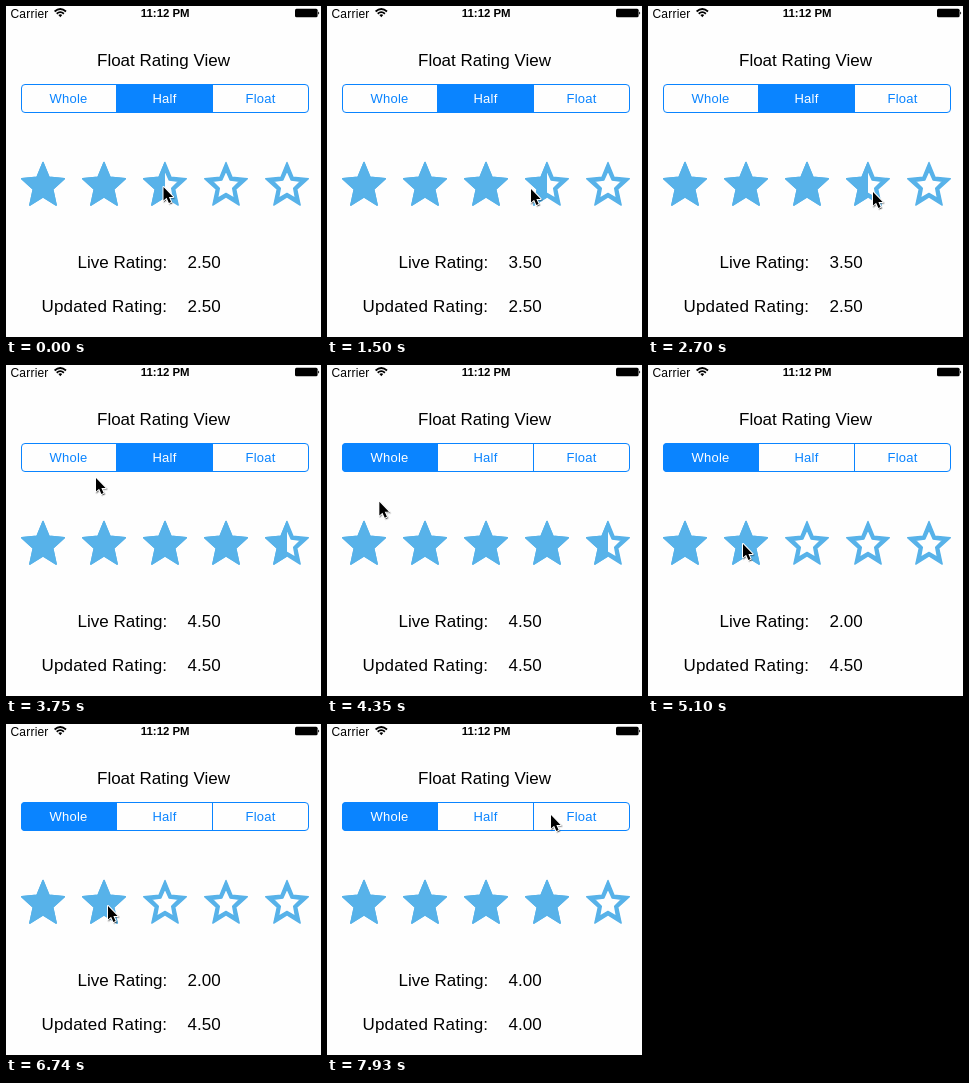
Animation of 315x331 px, one loop 8000 ms. Source, as an HTML page:

```html
<!DOCTYPE html>
<html lang="en">
<head>
<meta charset="utf-8">
<title>Float Rating View</title>
<style>
  html, body { margin: 0; width: 100%; height: 100%; overflow: hidden; background: #fefefe; }
  svg { display: block; width: 315px; height: 331px; }
  text { font: 17px "Liberation Sans", Arial, sans-serif; fill: #000; }
  .tab rect { fill: none; }
  .tab text { font-size: 13px; letter-spacing: .2px; text-anchor: middle; fill: #0a84ff; }
  .tab.on rect { fill: #0a84ff; }
  .tab.on text { fill: #fff; }
  .bar { font-size: 12px; letter-spacing: .2px; }
  .clock { font-size: 11.4px; font-weight: bold; text-anchor: middle; }
  .end { text-anchor: end; }
  .star { fill: #57b2e9; fill-rule: evenodd; stroke: #57b2e9; stroke-width: 1.4; stroke-linejoin: round; }
</style>
</head>
<body>
<svg viewBox="0 0 315 331">
  <defs>
    <clipPath id="lit"><rect id="litBox" x="0" y="150" height="60"/></clipPath>
    <clipPath id="pill"><rect x="15" y="78" width="288" height="29" rx="4"/></clipPath>
  </defs>
  <rect width="315" height="331" fill="#fefefe"/>

  <text class="bar" x="4.5" y="11.5">Carrier</text>
  <g fill="none" stroke="#000" stroke-width="1.8">
    <path d="M48.6 5.5Q54.3 .5 60 5.5"/>
    <path d="M50.7 7.7Q54.3 4.6 57.9 7.7"/>
    <path d="M52.4 9.1Q54.3 7.6 56.2 9.1L54.3 11.2Z" fill="#000" stroke="none"/>
  </g>
  <text class="clock" x="159.2" y="11">11:12 PM</text>
  <rect x="289" y="2.8" width="22.6" height="8.4" rx="1.5"/>
  <path d="M312.2 5.4Q314.2 7 312.2 8.6Z"/>

  <text x="91" y="59.5">Float Rating View</text>

  <g id="tabs" clip-path="url(#pill)"></g>
  <g fill="none" stroke="#0a84ff">
    <rect x="15.5" y="78.5" width="287" height="28" rx="3.5"/>
    <path d="M110.5 79V107M206.5 79V107"/>
  </g>

  <g id="outlines"></g>
  <g id="solids" clip-path="url(#lit)"></g>

  <text class="end" x="161.3" y="261.5">Live Rating:</text>
  <text class="end" x="161.3" y="305.5" letter-spacing=".2">Updated Rating:</text>
  <text id="live" x="181.5" y="261.5"></text>
  <text id="updated" x="181.5" y="305.5"></text>

  <g id="cursor" stroke-linejoin="round">
    <path d="M.6 1V15L3.9 12 6.3 17.2 8.7 16.2 6.4 11.2H10.8Z" stroke="#000" stroke-opacity=".12" stroke-width="2.4"/>
    <path d="M0 0V13.6L3.1 10.8 5.4 16 7.6 15 5.4 10H9.6Z" stroke="#fff" stroke-width="2" paint-order="stroke"/>
  </g>
</svg>
<script>
const LOOP = 8000, PITCH = 61, WHOLE_FROM = 4050;
const $ = id => document.getElementById(id);

// Turning points of the pointer: time, x, y
const path = [
  [0, 157.5, 181], [600, 157.5, 181], [1200, 230, 183], [1500, 204, 183],
  [2100, 69, 181], [2700, 225, 186], [3300, 274, 185], [3450, 274, 185],
  [3750, 90, 113], [4200, 60, 94], [4700, 45, 178], [5100, 95, 179],
  [5850, 228, 182], [6740, 102, 182], [7040, 232.5, 186], [7490, 232.5, 186],
  [7930, 224, 91], [LOOP, 224, 91]
];
const drags = [
  { from: 0, to: 3600, half: true },
  { from: 4650, to: 6890, half: false },
  { from: 7340, to: 7490, half: false }
];

// The screen refreshes in coarse ticks
function snap(t) {
  if (t >= 7930) return 7930;
  const base = t < 6740 ? 0 : 6740;
  return base + Math.floor((t - base) / 150) * 150;
}

const easeOut = k => k * (2 - k);

function pointAt(t) {
  const i = path.findIndex(p => p[0] > t);
  const [t0, x0, y0] = path[i - 1], [t1, x1, y1] = path[i];
  const k = easeOut((t - t0) / (t1 - t0));
  return [x0 + (x1 - x0) * k, y0 + (y1 - y0) * k];
}

function rate(x, half) {
  const i = Math.max(0, Math.min(4, Math.floor((x - 9) / PITCH)));
  if (!half) return i + 1;
  const part = (x - 9 - i * PITCH) / 56;
  return i + (part > .75 ? 1 : part > .2 ? .5 : 0);
}

const dragValue = (d, t) => rate(pointAt(snap(Math.min(t, d.to - 1)))[0], d.half);

function add(parent, tag, attrs, text) {
  const el = document.createElementNS("http://www.w3.org/2000/svg", tag);
  for (const k in attrs) el.setAttribute(k, attrs[k]);
  if (text) el.textContent = text;
  return parent.appendChild(el);
}

function starPath(cx, cy, outer, inner) {
  const points = Array.from({ length: 10 }, (_, i) => {
    const r = i % 2 ? inner : outer, a = i * Math.PI / 5;
    return [cx + .95 * r * Math.sin(a), cy - r * Math.cos(a)].map(v => v.toFixed(2));
  });
  return `M${points.join("L")}Z`;
}

for (let i = 0; i < 5; i++) {
  const cx = 37 + i * PITCH, cy = 180;
  const body = starPath(cx, cy, 23.6, 10.8), hole = starPath(cx, cy, 15.2, 7.4);
  add($("outlines"), "path", { class: "star", d: body + hole });
  add($("solids"), "path", { class: "star", d: body });
}

const tabs = ["Whole", "Half", "Float"].map((name, i) => {
  const g = add($("tabs"), "g", { class: "tab" });
  add(g, "rect", { x: 15 + i * 96, y: 78, width: 96, height: 29 });
  add(g, "text", { x: 62.5 + i * 96, y: 97 }, name);
  return g;
});

function draw(time) {
  const t = snap(time);
  const [x, y] = pointAt(t);
  const live = dragValue(drags.filter(d => d.from <= t).pop(), t);
  const done = drags.filter(d => d.to <= t).pop();
  const updated = done ? dragValue(done, t) : 2.5;
  const n = Math.floor(live);

  $("cursor").setAttribute("transform", `translate(${x} ${y})`);
  $("litBox").setAttribute("width", (live > n ? 37 : 7) + n * PITCH);
  $("live").textContent = live.toFixed(2);
  $("updated").textContent = updated.toFixed(2);
  const active = t < WHOLE_FROM ? 1 : 0;
  tabs.forEach((g, i) => g.classList.toggle("on", i === active));
}

const start = performance.now();
function frame() {
  draw((performance.now() - start) % LOOP);
  requestAnimationFrame(frame);
}
frame();
</script>
</body>
</html>
```
